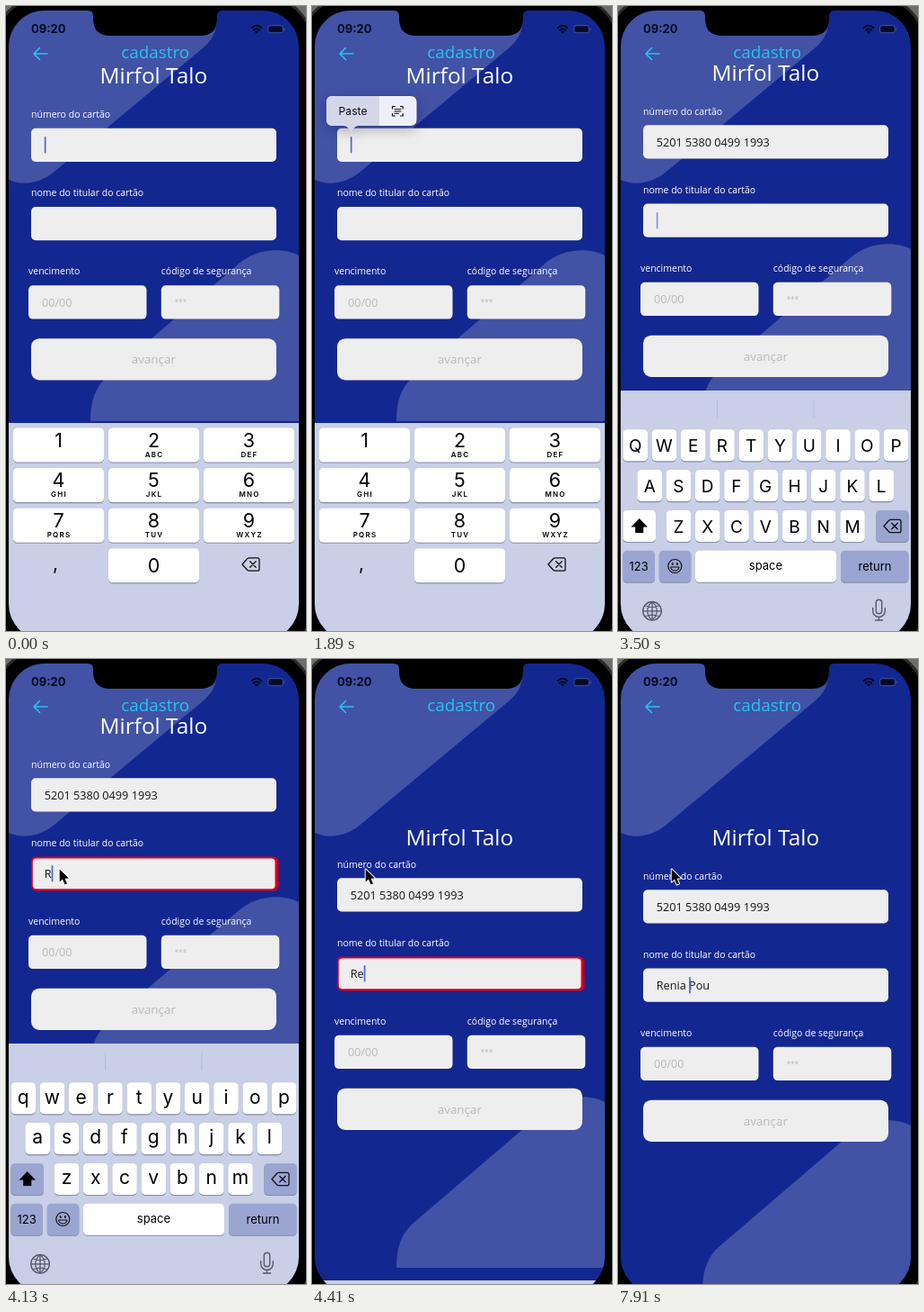
An HTML page with a canvas that plays this animation: 334 by 694 pixels, repeating every 8 s.

```html
<!DOCTYPE html>
<html lang="pt">
<head>
<meta charset="utf-8">
<title>Cadastro</title>
<style>
html, body { margin: 0; width: 100%; height: 100%; overflow: hidden; background: #000; }
canvas { display: block; width: 334px; height: 694px; }
</style>
</head>
<body>
<canvas id="stage"></canvas>
<script>
const W = 334, H = 694, LOOP = 8000, STEP = 70;
const BODY = '"Open Sans", "Noto Sans", sans-serif';
const SYS = 'Inter, Roboto, sans-serif';
const BLUE = '#132790', BLOB = '#4252a5', CYAN = '#25c5ee', PAPER = '#eeeeee';
const PANEL = '#c8cfe6', MUTED = '#9ba5d2', HINT = '#b9b9bb';
const CARD = '5201 5380 0499 1993', HOLDER = 'Renia Pou';

const canvas = document.getElementById('stage');
const ctx = canvas.getContext('2d');
const dpr = window.devicePixelRatio || 1;
canvas.width = W * dpr;
canvas.height = H * dpr;

// Linear interpolation through [time, value] pairs.
function tween(t, keys) {
  if (t <= keys[0][0]) return keys[0][1];
  for (let i = 1; i < keys.length; i++) {
    const [t0, a] = keys[i - 1], [t1, b] = keys[i];
    if (t < t1) return a + (b - a) * (t - t0) / (t1 - t0);
  }
  return keys[keys.length - 1][1];
}

// Last value whose start time has passed.
function latest(t, keys) {
  let v = 0;
  for (const [at, val] of keys) if (t >= at) v = val;
  return v;
}

const caretAlpha = [[70, 1], [280, 0], [420, 0], [630, 1], [910, 1], [1050, 0], [1470, 0],
  [1610, 1], [2520, 1], [2730, 0], [2870, 0], [2940, 1], [3430, 1], [3640, 0], [3780, 0], [3990, 1]];
const shiftKeys = [[2870, 0], [2940, -1.7], [3010, -3], [3080, -3.5], [4130, -3.5], [4200, 10],
  [4270, 40.5], [4340, 76], [4410, 107.5], [4480, 115], [4550, 118.5], [4690, 120.5]];
const panelTop = [[2870, 463], [2940, 445], [3010, 431], [3080, 427], [4130, 427], [4200, 512],
  [4270, 608], [4340, 661], [4410, 690], [4480, 706]];
const typed = [[4130, 1], [4410, 2], [4970, 3], [5390, 4], [5530, 5], [5950, 6], [6090, 7], [6300, 8], [6930, 9]];
const caretMoves = [...typed, [7630, 8], [7770, 7], [7910, 6]];

function box(x, y, w, h, r, fill) {
  ctx.beginPath();
  ctx.roundRect(x, y, w, h, r);
  ctx.fillStyle = fill;
  ctx.fill();
}

function text(str, x, y, size, color, { font = BODY, weight = 400, align = 'left', track = 0 } = {}) {
  ctx.font = `${weight} ${size}px ${font}`;
  ctx.letterSpacing = track + 'px';
  ctx.textAlign = align;
  ctx.fillStyle = color;
  ctx.fillText(str, x, y);
}

function stroke(d, color, width) {
  ctx.strokeStyle = color;
  ctx.lineWidth = width;
  ctx.stroke(new Path2D(d));
}

function fill(d, color) {
  ctx.fillStyle = color;
  ctx.fill(new Path2D(d));
}

function at(x, y, draw) {
  ctx.save();
  ctx.translate(x, y);
  draw();
  ctx.restore();
}

function faded(alpha, draw) {
  if (alpha <= 0) return;
  ctx.save();
  ctx.globalAlpha = alpha;
  draw();
  ctx.restore();
}

function blobs(t, shift) {
  fill('M3 5H235V12C235 29 229 38 220 46L55 183C39 197 19 200 3 193Z', BLOB);
  const cut = tween(t, [[4130, 0], [4200, 17], [4270, 17], [4410, 0]]);
  at(0, 271 + 2 * shift, () => {
    ctx.beginPath();
    ctx.rect(0, -10, W, 200 - cut);
    ctx.clip();
    fill('M326 6C311 -2 280 -4 257 17L112 141C99 153 94 168 94 190H326Z', BLOB);
  });
}

function caret(x, y, alpha) {
  faded(alpha, () => box(x, y, 1.7, 18.5, 0.8, '#4969cf'));
}

function textWidth(str, size) {
  ctx.font = `400 ${size}px ${BODY}`;
  ctx.letterSpacing = '0px';
  return ctx.measureText(str).width;
}

function form(t) {
  const pasted = t >= 1960, onHolder = t >= 2940, alpha = tween(t, caretAlpha);
  const label = (s, x, y) => text(s, x, y, 10.5, '#fff');

  label('número do cartão', 28, 124);
  box(28, 135.7, 273, 37.3, 5, PAPER);
  if (pasted) text(CARD, 42.7, 159, 12.7, '#161616');
  if (!onHolder) caret(pasted ? 43 + textWidth(CARD, 12.7) : 42.8, 145, alpha);

  label('nome do titular do cartão', 28, 211);
  if (t >= 4130 && t < 6090) {
    box(29, 223.5, 275, 38, 5, '#7c0f52');
    box(28, 223, 274, 37.5, 5, '#d9001f');
    box(29.8, 225, 269.7, 33.7, 4, PAPER);
  } else {
    box(28, 223, 273, 37.3, 5, PAPER);
  }
  text(HOLDER.slice(0, latest(t, typed)), 42.7, 246.3, 12.7, '#161616');
  if (onHolder) {
    caret(42.8 + textWidth(HOLDER.slice(0, latest(t, caretMoves)), 12.7), 232.5, alpha);
  }

  label('vencimento', 25, 298.3);
  box(25, 310.3, 131.5, 37.3, 5, PAPER);
  text('00/00', 40, 333.6, 12.6, HINT);
  label('código de segurança', 172.8, 298.3);
  box(172.8, 310.3, 131.5, 37.3, 5, PAPER);
  text('***', 187.5, 332, 8.4, HINT);

  box(28, 369.2, 273, 46.3, 9, PAPER);
  text('avançar', 164.3, 397.2, 13.4, HINT, { align: 'center' });
}

function heading(t, shift) {
  if (t >= 4200 && t < 4410) return;
  const y = t < 4200 ? 86 + shift : 206.7;
  text('Mirfol Talo', 164.3, y, 24.4, '#fff', { align: 'center' });
}

function header() {
  stroke('M46 53H31M37.5 46.5L31 53L37.5 59.5', CYAN, 1.6);
  text('cadastro', 166.2, 58.3, 18.9, CYAN, { align: 'center' });
}

function statusBar() {
  const ink = '#050a20';
  text('09:20', 28, 30.2, 13, ink, { font: SYS, weight: 700 });
  for (let i = 0; i < 4; i++) box(257 + i * 3.2, 27.5, 1.8, 1.8, 0.9, '#1b2a72');
  stroke('M273.6 24.3Q279 19.2 284.4 24.3M275.7 26.8Q279 23.7 282.3 26.8', ink, 1.9);
  fill('M276.8 28.4Q279 26.6 281.2 28.4L279 30.8Z', ink);
  ctx.beginPath();
  ctx.roundRect(291.5, 21.5, 17, 8.3, 2.5);
  ctx.strokeStyle = '#3a4990';
  ctx.lineWidth = 1;
  ctx.stroke();
  box(292.5, 22.5, 15, 6.3, 1.6, ink);
  box(309.6, 24, 1.3, 3.4, 0.7, '#3a4990');
}

function key(x, y, w, h, color = '#fff') {
  box(x, y + 1.1, w, h, 4.5, '#868ca8');
  box(x, y, w, h, 4.5, color);
}

function eraser(x, y) {
  at(x, y, () => {
    stroke('M0 7.5L5.6 1.2Q6.5 0.3 8 0.3H17Q19 0.3 19 2.3V12.7Q19 14.7 17 14.7H8Q6.5 14.7 5.6 13.8Z', '#111', 1.3);
    stroke('M8.7 4.2L15.2 10.8M15.2 4.2L8.7 10.8', '#111', 1.3);
  });
}

// Keyboards are drawn relative to the top of the panel.
function numberPad() {
  const names = ['', 'ABC', 'DEF', 'GHI', 'JKL', 'MNO', 'PQRS', 'TUV', 'WXYZ'];
  const opt = { font: SYS, align: 'center' };
  names.forEach((name, i) => {
    const x = 8 + (i % 3) * 106, y = 5.5 + Math.floor(i / 3) * 44.6;
    key(x, y, 101, 38, '#fff');
    text(i + 1, x + 50.5, y + 21, 21.5, '#000', opt);
    text(name, x + 51, y + 32.2, 8, '#000', { ...opt, weight: 600, track: 1.2 });
  });
  key(114, 139.3, 101, 38);
  text('0', 164.5, 165.8, 21.5, '#000', opt);
  text(',', 55, 163, 21, '#000', opt);
  eraser(263, 149.5);
}

function smiley(x, y) {
  at(x, y, () => {
    stroke('M-7.5 0A7.5 7.5 0 1 1 7.5 0A7.5 7.5 0 1 1 -7.5 0', '#111', 1.2);
    box(-3.5, -4, 1.8, 3, 0.9, '#111');
    box(1.7, -4, 1.8, 3, 0.9, '#111');
    stroke('M-4.7 1H4.7Q4 5 0 5Q-4 5 -4.7 1Z', '#111', 1.1);
  });
}

function globe(x, y) {
  at(x, y, () => {
    stroke('M-10.3 0A10.3 10.3 0 1 1 10.3 0A10.3 10.3 0 1 1 -10.3 0M-10 0H10M0 -10V10', '#545a6d', 1.3);
    stroke('M0 -10C-7 -5 -7 5 0 10C7 5 7 -5 0 -10M-8 -6Q0 -2.5 8 -6M-8 6Q0 2.5 8 6', '#545a6d', 1.2);
  });
}

function mic(x, y) {
  at(x, y, () => {
    stroke('M-3.2 -8A3.2 3.2 0 0 1 3.2 -8V1A3.2 3.2 0 0 1 -3.2 1Z', '#545a6d', 1.4);
    stroke('M-6.8 -2V1.2A6.8 6.8 0 0 0 6.8 1.2V-2M0 8V11.5M-4 11.5H4', '#545a6d', 1.4);
  });
}

function letterBoard(upper) {
  const opt = { font: SYS, align: 'center' };
  box(110, 10, 1, 20, 0, '#b3bbd8');
  box(217.5, 10, 1, 20, 0, '#b3bbd8');
  [['qwertyuiop', 5.5], ['asdfghjkl', 21.5], ['zxcvbnm', 53.8]].forEach(([row, left], r) => {
    [...row].forEach((c, i) => {
      const x = left + i * 32.25, y = 43.3 + r * 44.8;
      key(x, y, 27.5, 35);
      text(upper ? c.toUpperCase() : c, x + 13.7, y + (upper ? 24.6 : 23.2), upper ? 19 : 21, '#000', opt);
    });
  });
  key(5.5, 132.9, 36.5, 35, upper ? '#fff' : MUTED);
  fill('M23.7 142L33 151.5H28.3V158H19.2V151.5H14.5Z', '#000');
  key(287.3, 132.9, 36.5, 35, MUTED);
  eraser(296, 143);
  key(5.5, 177.7, 35.5, 35, MUTED);
  text('123', 23.2, 200, 13, '#000', opt);
  key(45.8, 177.7, 35.5, 35, MUTED);
  smiley(63.3, 195);
  key(86, 177.7, 157, 35);
  text('space', 164.5, 199, 13, '#000', opt);
  key(248, 177.7, 75.5, 35, MUTED);
  text('return', 286, 200, 13, '#000', opt);
  globe(38, 244.8);
  mic(290.5, 243.5);
}

function keyboard(t) {
  const top = tween(t, panelTop);
  if (top > 704) return;
  ctx.fillStyle = PANEL;
  ctx.fillRect(0, top, W, H - top + 10);
  const swap = tween(t, [[2870, 0], [3080, 1]]);
  at(0, top, () => {
    faded(1 - swap, numberPad);
    faded(swap, () => letterBoard(t < 4130));
  });
}

function loupe(t) {
  faded(tween(t, [[420, 0], [490, 0.25], [630, 0.6], [700, 0.35], [770, 0]]), () => {
    ctx.shadowColor = 'rgba(0,0,40,.3)';
    ctx.shadowBlur = 6 * dpr;
    box(36, 121, 65, 45, 21, '#f4f4f6');
  });
}

function pasteMenu(t) {
  const alpha = tween(t, [[840, 0], [910, 0.15], [1050, 0.65], [1260, 1], [1890, 1], [2170, 0]]);
  const pressed = t >= 1890;
  const outline = 'M23 100H109.5Q116.5 100 116.5 107V126Q116.5 133 109.5 133H51Q48 133 46 136L43.7 139.5L41 136Q39 133 36 133H23Q16 133 16 126V107Q16 100 23 100Z';
  faded(alpha, () => {
    ctx.save();
    ctx.shadowColor = 'rgba(10,15,60,.3)';
    ctx.shadowBlur = 14 * dpr;
    ctx.shadowOffsetY = 4 * dpr;
    fill(outline, '#eeeffb');
    ctx.restore();
    ctx.save();
    ctx.clip(new Path2D(outline));
    if (pressed) fill('M16 100H75V140H16Z', '#d3d7e7');
    else fill('M74.5 100H75.2V133H74.5Z', '#c9cde0');
    ctx.restore();
    text('Paste', 29.5, 121, 12.2, '#0c0e18', { font: SYS });
    stroke('M89.5 114V111.5H92.5M98.5 111.5H101.2V114M101.2 119.5V122H98.5M92.5 122H89.5V119.5', '#111', 1.2);
    stroke('M92 114.7H99M92 117H99M92 119.3H96.5', '#111', 1);
  });
}

function pointer(t) {
  if (t < 3850) return;
  faded(tween(t, [[3780, 0], [3920, 1]]), () => at(59.7, 233.5, () => {
    const d = 'M0 0V14L3.2 11.1L5.8 17L8.3 15.9L5.8 10.2L10.2 9.9Z';
    ctx.lineJoin = 'round';
    stroke(d, '#fff', 2);
    fill(d, '#000');
  }));
}

function frame(now) {
  const t = Math.floor((now % LOOP) / STEP) * STEP;
  const shift = tween(t, shiftKeys);
  ctx.setTransform(dpr, 0, 0, dpr, 0, 0);
  ctx.lineCap = ctx.lineJoin = 'round';

  // Phone body
  ctx.fillStyle = '#6d6d6d';
  ctx.fillRect(0, 0, W, H);
  box(-14, -12, 357, 733, 56, '#2c2c2c');
  box(-11, -9, 351, 727, 53, '#000');

  // Screen
  ctx.save();
  ctx.beginPath();
  ctx.roundRect(3, 5, 323, 699, 40);
  ctx.clip();
  ctx.fillStyle = BLUE;
  ctx.fillRect(0, 0, W, H);
  blobs(t, shift);
  heading(t, shift);
  at(0, shift, () => form(t));
  header();
  statusBar();
  loupe(t);
  pasteMenu(t);
  keyboard(t);
  fill('M91 4V5Q97 5 97 11V14Q97 33 116 33H216Q235 33 235 14V11Q235 5 241 5V4Z', '#000');
  ctx.restore();

  pointer(t);
}

const start = performance.now();
function tick() {
  frame(performance.now() - start);
  requestAnimationFrame(tick);
}
tick();
</script>
</body>
</html>
```
